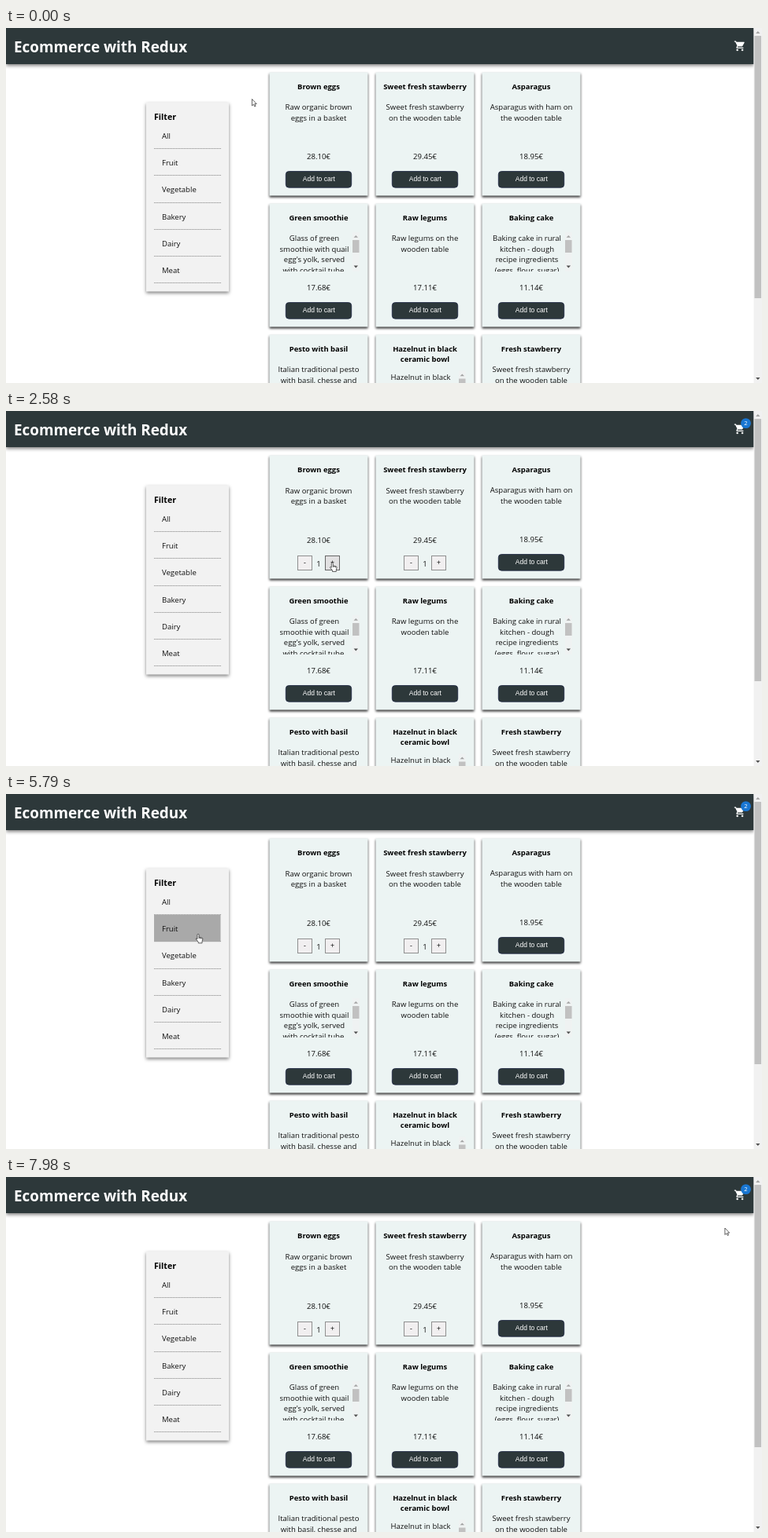
An HTML page for the animation above (8 s loop, 960 by 452 pixels).

```html
<!DOCTYPE html>
<html lang="en">
<head>
<meta charset="utf-8">
<title>Ecommerce with Redux</title>
<style>
  html, body { margin: 0; width: 100%; height: 100%; overflow: hidden; background: #fff; }
  svg { display: block; font: 9.55px "Open Sans", "Noto Sans", sans-serif; fill: #111; }
  .bold { font-weight: 700; font-size: 9.45px; fill: #000; }
  .button { font: 8.5px "Liberation Sans", Arial, sans-serif; }
  .mid { text-anchor: middle; }
  .raised { filter: drop-shadow(0 2px 1.4px rgba(0, 0, 0, .8)); }
  .floating { filter: drop-shadow(0 2px 2.2px rgba(0, 0, 0, .5)); }
</style>
</head>
<body>
<svg id="stage" width="960" height="452" viewBox="0 0 960 452">
  <g id="page"></g>
  <g id="live"></g>
</svg>
<script>
const LOOP = 8000;
const DARK = '#2d383a';
const PRODUCTS = [
  { title: ['Brown eggs'], text: ['Raw organic brown', 'eggs in a basket'], price: '28.10€' },
  { title: ['Sweet fresh stawberry'], text: ['Sweet fresh stawberry', 'on the wooden table'], price: '29.45€' },
  { title: ['Asparagus'], text: ['Asparagus with ham on', 'the wooden table'], price: '18.95€' },
  { title: ['Green smoothie'], text: ['Glass of green', 'smoothie with quail', "egg's yolk, served", 'with cocktail tube,'], price: '17.68€' },
  { title: ['Raw legums'], text: ['Raw legums on the', 'wooden table'], price: '17.11€' },
  { title: ['Baking cake'], text: ['Baking cake in rural', 'kitchen - dough', 'recipe ingredients', '(eggs, flour, sugar)'], price: '11.14€' },
  { title: ['Pesto with basil'], text: ['Italian traditional pesto', 'with basil, chesse and'] },
  { title: ['Hazelnut in black', 'ceramic bowl'], text: ['Hazelnut in black', 'ceramic bowl on', 'the wooden table'] },
  { title: ['Fresh stawberry'], text: ['Sweet fresh stawberry', 'on the wooden table'] }
].map((p, i) => ({ ...p, x: 334 + 135 * (i % 3), y: 56 + 167 * Math.floor(i / 3) }));
const FILTERS = ['All', 'Fruit', 'Vegetable', 'Bakery', 'Dairy', 'Meat'];
const ROW = 34.25;

// Cursor stops: [time, x, y]
const PATH = [
  [0, 312, 90], [250, 312, 90], [1000, 397, 192], [1300, 397, 192], [1750, 507, 188], [2050, 507, 188],
  [2600, 414, 193], [2850, 414, 193], [3300, 380, 190], [3700, 380, 190], [4500, 543, 194],
  [4850, 543, 194], [5700, 244, 177], [5850, 244, 179], [6350, 230, 310], [6950, 211, 135.5],
  [7100, 211, 135.5], [7850, 912.5, 64.5], [LOOP, 912.5, 64.5]
];
// Cart clicks: [time, product, change]
const CLICKS = [[1250, 0, 1], [2000, 1, 1], [2750, 0, 1], [3600, 0, -1]];

const rect = (x, y, w, h, fill, more = '') =>
  `<rect x="${x}" y="${y}" width="${w}" height="${h}" fill="${fill}" ${more}/>`;
const label = (x, y, text, cls = '', more = '') =>
  `<text x="${x}" y="${y}" class="${cls}" ${more}>${text}</text>`;
const shape = (d, fill, more = '') => `<path d="${d}" fill="${fill}" ${more}/>`;
const arrow = (x, y, dir, fill) => shape(`M${x - 2.7} ${y + dir * -1.4}h5.4l-2.7 ${dir * 2.8}z`, fill);
const group = (x, y, content) => `<g transform="translate(${x} ${y})">${content}</g>`;
const hasScroll = p => p.text.length > 2;

function description(p, shift = 0) {
  const drop = p.title.length > 1 ? 9.5 : 0;
  const center = hasScroll(p) ? 57.5 : 63;
  const lines = p.text.map((line, i) => label(center, 48 + drop + shift + 13.5 * i, line, 'mid')).join('');
  const bar = hasScroll(p)
    ? rect(106, 37 + drop, 8.5, 50, '#eff2f2') + arrow(110.3, 42.3 + drop, -1, '#a3a3a3') +
      rect(106, 47 + drop, 8.5, 16, '#c1c1c1') + arrow(110.3, 81 + drop, 1, '#505050')
    : '';
  return `<svg width="126" height="${87 + drop}">${lines}${bar}</svg>`;
}

function drawPage() {
  const cards = PRODUCTS.map(p => group(p.x, p.y,
    rect(.5, .5, 125, 157, '#ecf4f3', 'class="raised"') +
    p.title.map((line, i) => label(63, 21.5 + 13.5 * i, line, 'bold mid')).join('')));
  const filters = FILTERS.map((_, i) =>
    shape(`M188 ${Math.round(153 + ROW * i) + .5}h85`, 'none', 'stroke="#999" stroke-dasharray="1.3 .7"'));
  return cards.join('') +
    rect(0, 0, 949.5, 46, DARK, 'class="floating"') +
    label(10, 31, 'Ecommerce with Redux', 'bold', 'style="font-size:18.85px;fill:#fff"') +
    `<g transform="translate(924.2 15.2) scale(.64)">` + shape(
      'M7 18a2 2 0 1 0 0 4 2 2 0 0 0 0-4zM1 2v2h2l3.6 7.6-1.35 2.4C4.5 15.4 5.5 17 7 17h12v-2H7.4' +
      'q-.4-.1-.2-.4l.9-1.6h7.5c.7 0 1.4-.4 1.7-1l3.6-6.5c.4-.7-.2-1.5-.9-1.5H5.2l-.9-2z' +
      'M17 18a2 2 0 1 0 0 4 2 2 0 0 0 0-4z', '#fff') + '</g>' +
    rect(178, 95, 105, 240.5, '#f2f2f2', 'class="floating"') +
    label(188, 116.5, 'Filter', 'bold', 'style="font-size:10.6px"') + filters.join('') +
    rect(949.5, 0, 10.5, 452, '#f1f1f1') + rect(950.5, 10, 8.5, 334, '#c1c1c1') +
    arrow(954.8, 5.5, -1, '#a3a3a3') + arrow(954.8, 446.5, 1, '#505050');
}

function cursorAt(t) {
  const i = PATH.findIndex(stop => stop[0] > t);
  const [t0, x0, y0] = PATH[i - 1], [t1, x1, y1] = PATH[i];
  const k = (1 - Math.cos(Math.PI * (t - t0) / (t1 - t0))) / 2;
  return { x: x0 + (x1 - x0) * k, y: y0 + (y1 - y0) * k };
}

function drawLive(t) {
  const cursor = cursorAt(t);
  const done = CLICKS.filter(c => c[0] <= t);
  const count = product => done.reduce((sum, c) => sum + (c[1] === product ? c[2] : 0), 0);
  let pointing = false;
  const over = (x, y, w, h) => {
    const hit = cursor.x >= x && cursor.x < x + w && cursor.y >= y && cursor.y < y + h;
    pointing = pointing || hit;
    return hit;
  };

  const stepper = (p, x, sign) => {
    const hot = over(p.x + x, p.y + 128, 19, 19);
    return rect(x + .5, 128.5, 18, 18, hot ? '#e2e1e2' : '#f1eff0', `stroke="${hot ? '#666' : '#8f8f8f'}"`) +
      label(x + 9.5, 140, sign, 'button mid');
  };
  const addButton = p => rect(21.3, 126.5, 83.4, 20.7, over(p.x + 21, p.y + 126, 84, 21) ? '#265570' : DARK,
    'rx="4" stroke="#1b2440" stroke-width=".8"') +
    label(63.3, 139, 'Add to cart', 'button mid', 'style="fill:#fff"');

  const cards = PRODUCTS.map((p, i) => {
    const n = count(i);
    const controls = n ? stepper(p, 36, '-') + label(63, 142, n, 'mid') + stepper(p, 71, '+') : addButton(p);
    const price = p.price ? label(63, n ? 112 : 111, p.price, 'mid') : '';
    return group(p.x, p.y, description(p, n ? .5 : 0) + price + controls);
  });

  const filters = FILTERS.map((name, i) => {
    const y = 119.7 + ROW * i;
    return (over(188, y, 85, ROW) ? rect(188, y, 84.5, ROW, '#a9a9a9') : '') + label(198, y + 21.2, name);
  });

  const total = done.reduce((sum, c) => sum + c[2], 0);
  const grow = Math.min(1, (t - CLICKS[0][0]) / 200);
  const badge = total ? `<g transform="translate(939.5 15.6) scale(${grow})"><circle r="6.4" fill="#1976d2"/>` +
    label(0, 2.8, total, 'mid', 'style="font-size:7.6px;fill:#fff"') + '</g>' : '';

  const outline = 'stroke="#222" stroke-width=".7" stroke-linejoin="round"';
  const pointer = pointing
    ? shape('M-1 1a1 1 0 0 1 2 0V4l3.6.8q1.2.3 1.2 1.5L5 9.5v2H.2V10L-2.6 6.6q-.4-1.2.8-1l.8.8z', '#fff', outline) +
      shape('M1 4v2M2.6 4.5v1.6M4.2 4.9v1.5', 'none', outline)
    : shape('M.4 .5v8.5l2-1.8 1.4 2.8 1.3-.6-1.3-2.8h2.4z', '#fff', outline);

  return cards.join('') + filters.join('') + badge + group(cursor.x, cursor.y, pointer);
}

const page = document.getElementById('page');
const live = document.getElementById('live');
page.innerHTML = drawPage();

function tick() {
  live.innerHTML = drawLive(performance.now() % LOOP);
  requestAnimationFrame(tick);
}
tick();
</script>
</body>
</html>
```
